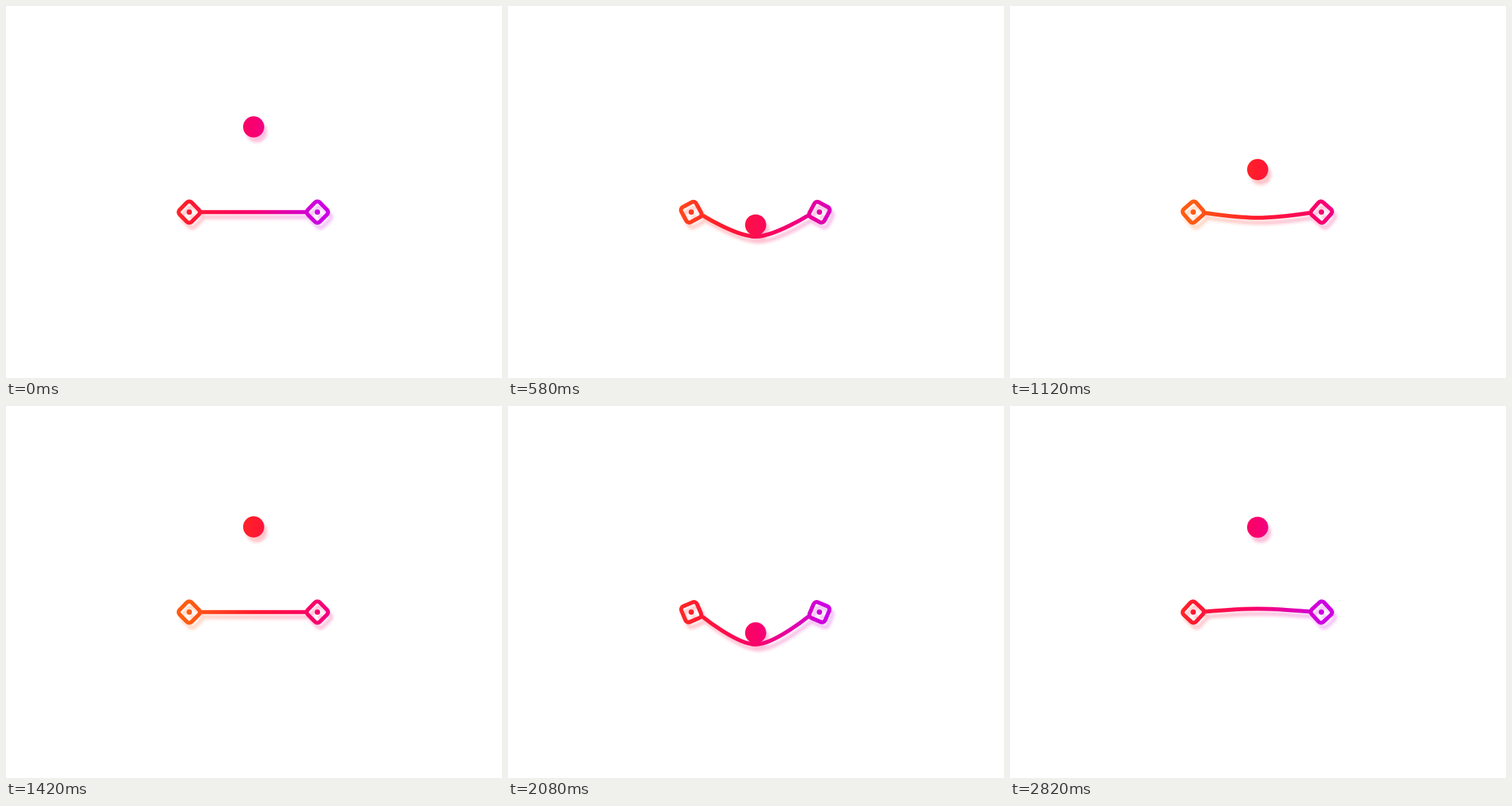
Write an HTML page with a canvas that moves like this. It is 747 px wide and 560 px high and loops after 2840 ms.

```html
<!DOCTYPE html>
<html lang="en">
<head>
<meta charset="utf-8">
<title>Bouncing ball</title>
<style>
  html, body { margin: 0; width: 100%; height: 100%; overflow: hidden; background: #fff; }
  canvas { display: block; }
</style>
</head>
<body>
<canvas id="stage" width="747" height="560"></canvas>
<script>
const W = 747, H = 560;
const LOOP = 2840, BOUNCE = 1420, STEP = 20;
const LEFT = 276, RIGHT = 469, MID = 372.75, REST = 310.3;
const GAP = 17.5; // ball centre to string while they touch
const COLORS = ['#ff5c12', '#ff1a2e', '#f8006f', '#cd00e4'];

// ball height: [ms, y]
const FALL = [
  [0, 182], [100, 183.4], [200, 191.5], [300, 213], [380, 243], [460, 281],
  [540, 317], [600, 334], [660, 341.5], [740, 343.8], [790, 344.2],
  [840, 344], [880, 341.2], [940, 330.5], [1000, 313.5], [1080, 265.5],
  [1180, 222], [1280, 193.5], [1340, 186], [1400, 182.6], [1420, 182]
];

const ctx = document.getElementById('stage').getContext('2d');
const layer = document.createElement('canvas');
layer.width = W;
layer.height = H;
const pen = layer.getContext('2d');

const clamp = x => Math.min(1, Math.max(0, x));
const smooth = x => { x = clamp(x); return x * x * (3 - 2 * x); };

// slope limited so the curve never overshoots its points
function tangent(pts, i) {
  if (i === 0 || i === pts.length - 1) return 0;
  const [a, b, c] = [pts[i - 1], pts[i], pts[i + 1]];
  const p = (b[1] - a[1]) / (b[0] - a[0]);
  const q = (c[1] - b[1]) / (c[0] - b[0]);
  return p * q <= 0 ? 0 : 2 * p * q / (p + q);
}

function curve(pts, t) {
  let i = 0;
  while (i < pts.length - 2 && t > pts[i + 1][0]) i++;
  const [t0, y0] = pts[i], [t1, y1] = pts[i + 1];
  const d = t1 - t0, u = (t - t0) / d, v = 1 - u;
  return y0 * v * v * (1 + 2 * u) + y1 * u * u * (3 - 2 * u)
    + d * u * v * (v * tangent(pts, i) - u * tangent(pts, i + 1));
}

// string without the ball: slow lift before the hit, damped swing after it
function freeSag(t) {
  if (t < 700) return -12 * smooth(t / 400);
  const s = t - 1035;
  return s < 0 ? -40 : -39.8 * Math.exp(-0.0048 * s) * Math.sin(Math.PI * s / 77);
}

function paint(shift) {
  const half = (RIGHT - LEFT) / 2;
  const from = LEFT + half * (shift - 1);
  const g = pen.createLinearGradient(from, 0, from + half * 3, 0);
  COLORS.forEach((c, i) => g.addColorStop(i / 3, c));
  return g;
}

function disc(x, y, r) {
  pen.beginPath();
  pen.arc(x, y, r, 0, Math.PI * 2);
  pen.fill();
}

function anchor(x, angle) {
  const c = Math.cos(angle + Math.PI / 4), s = Math.sin(angle + Math.PI / 4);
  const at = (px, py) => [x + px * c - py * s, REST + px * s + py * c];
  const h = 12.8;
  pen.beginPath();
  pen.moveTo(...at(0, -h));
  [[h, -h, h, h], [h, h, -h, h], [-h, h, -h, -h], [-h, -h, h, -h]]
    .forEach(([a, b, p, q]) => pen.arcTo(...at(a, b), ...at(p, q), 5));
  pen.closePath();
  pen.stroke();
  disc(x, REST, 4);
}

// straight at the anchors, rounded only around the middle
function string(sag, angle) {
  const reach = 18, handle = 28;
  const dx = reach * Math.cos(angle);
  const y = REST + reach * Math.sin(angle);
  const low = REST + sag;
  pen.beginPath();
  pen.moveTo(LEFT + dx, y);
  pen.bezierCurveTo(LEFT + dx, y, MID - handle, low, MID, low);
  pen.bezierCurveTo(MID + handle, low, RIGHT - dx, y, RIGHT - dx, y);
  pen.stroke();
}

function draw(time) {
  const t = time % BOUNCE;
  const ball = curve(FALL, t);
  const touch = ball + GAP - REST;
  const sag = Math.max(freeSag(t), touch);
  const angle = sag * 0.45 * Math.PI / 180;
  const blend = smooth((t - 460) / 240);
  const shift = time < BOUNCE ? blend : 1 - blend;

  pen.clearRect(0, 0, W, H);
  pen.fillStyle = pen.strokeStyle = paint(shift);
  pen.lineWidth = 6;
  string(sag, angle);
  anchor(LEFT, angle);
  anchor(RIGHT, -angle);
  disc(MID + 0.2, ball, 15.9);

  ctx.fillStyle = '#fff';
  ctx.fillRect(0, 0, W, H);
  ctx.save();
  ctx.globalAlpha = 0.25;
  ctx.filter = 'blur(2.2px)';
  ctx.drawImage(layer, 4.5, 7.5);
  ctx.restore();
  ctx.drawImage(layer, 0, 0);
}

const start = performance.now();
function tick() {
  const now = (performance.now() - start) % LOOP;
  draw(Math.floor(now / STEP) * STEP);
  requestAnimationFrame(tick);
}
tick();
</script>
</body>
</html>
```
